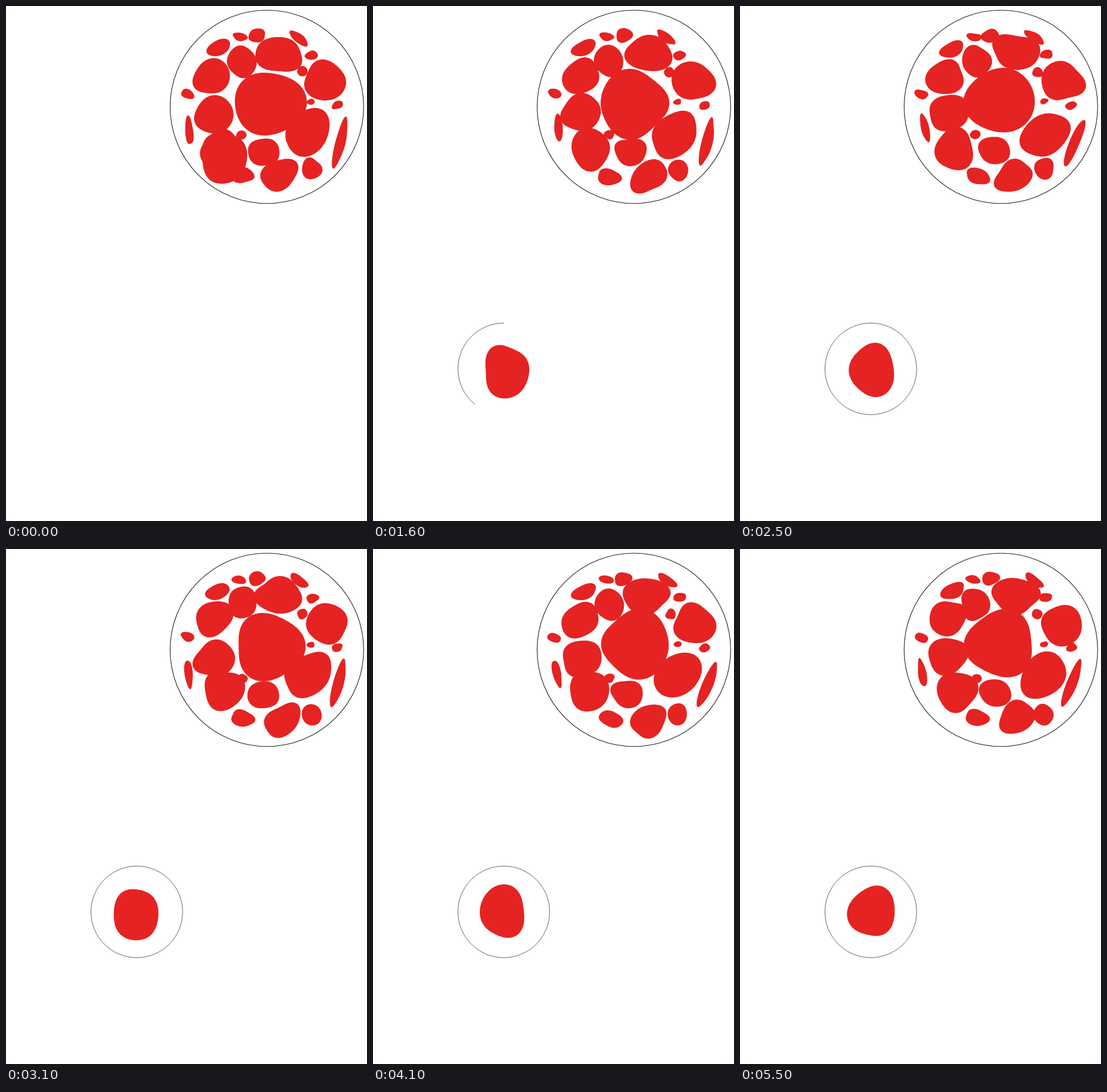
Animation, 626 px wide and 894 px high, one loop 7000 ms. Source, as an HTML page with a canvas:

```html
<!DOCTYPE html>
<html lang="en">
<head>
<meta charset="utf-8">
<title>Cells</title>
<style>
html, body { margin: 0; width: 100%; height: 100%; overflow: hidden; background: #fff; }
canvas { display: block; }
</style>
</head>
<body>
<canvas id="stage" width="626" height="894"></canvas>
<script>
const ctx = document.getElementById('stage').getContext('2d');
const LOOP = 7000, STEP = 100, REST = 5500;
const TRAVEL = 1200, RING_TIME = 1024;
const RED = '#e52322', INK = '#1d1d1b';
const clamp = v => Math.max(0, Math.min(1, v));

let seed = 11;
const rand = () => (seed = (seed * 16807) % 2147483647) / 2147483647;

// A slow wave from -1 to 1 with its own speed and phase.
function wave() {
  const period = 700 + rand() * 1100, phase = rand() * Math.PI * 2;
  return t => Math.sin(t / period * Math.PI * 2 + phase);
}

// A cell is an ellipse that drifts, turns and bulges on its own waves.
function cell([x, y, rx, ry, deg]) {
  const lumps = [0.05, 0.08, 0.035].map((size, i) => ({
    size, order: i + 2, angle: rand() * Math.PI * 2, swing: wave()
  }));
  return {
    x, y, rx, ry, lumps, turn: deg * Math.PI / 180,
    driftX: wave(), driftY: wave(), sway: wave()
  };
}

// Centre, radii and tilt of every cell at rest.
const cluster = [
  [454, 167, 60, 57, 0], [476, 82, 41, 31, 8], [556, 131, 37, 34, 20],
  [526, 221, 45, 35, -42], [361, 188, 36, 31, -20], [358, 123, 34, 29, -35],
  [375, 248, 34, 36, 0], [444, 251, 28, 24, 10], [477, 295, 34, 26, -35],
  [409, 94, 25, 28, -10],
  [509, 55, 19, 8, 36], [435, 51, 15, 12, -15], [405, 54, 13, 7, 10],
  [367, 74, 22, 13, -25], [531, 85, 11, 8, -10], [515, 114, 9, 9, 0],
  [315, 153, 12, 8, 20], [319, 214, 7, 25, -9], [577, 236, 9, 43, 18],
  [574, 172, 10, 7, -20], [528, 166, 7, 5, -10], [409, 224, 9, 8, 0],
  [528, 285, 17, 19, 0], [411, 295, 21, 14, 15]
].map(cell);
const mover = cell([0, 2, 40, 45, 0]);

function drawCell(c, t) {
  const drift = Math.min(3, c.ry * 0.15);
  const turn = c.turn + c.sway(t) * 0.08;
  ctx.save();
  ctx.translate(c.x + drift * c.driftX(t), c.y + drift * c.driftY(t));
  ctx.rotate(turn);
  ctx.beginPath();
  for (let i = 0; i < 90; i++) {
    const a = i / 90 * Math.PI * 2;
    let k = 1;
    for (const l of c.lumps) k += l.size * l.swing(t) * Math.cos(l.order * a + l.angle);
    ctx.lineTo(c.rx * k * Math.cos(a), c.ry * k * Math.sin(a));
  }
  ctx.fill();
  ctx.restore();
}

function ring(x, y, r, part, width) {
  const start = -Math.PI / 2;
  ctx.lineWidth = width;
  ctx.beginPath();
  ctx.arc(x, y, r, start, start - part * Math.PI * 2, true);
  ctx.stroke();
}

function draw(t) {
  ctx.fillStyle = '#fff';
  ctx.fillRect(0, 0, 626, 894);
  ctx.fillStyle = RED;
  ctx.strokeStyle = INK;
  for (const c of cluster) drawCell(c, t);

  // One cell leaves the cluster in a straight line.
  const go = clamp(t / TRAVEL);
  ctx.save();
  ctx.translate(380 - 152 * go, 262 + 368 * go);
  drawCell(mover, t);
  ctx.restore();

  ring(452.4, 175, 167.8, 1, 1.1);
  const drawn = clamp((t - TRAVEL) / RING_TIME);
  if (drawn > 0) ring(226.8, 629.9, 79.5, drawn, 0.7);
}

const begin = performance.now();
function tick() {
  const t = (performance.now() - begin) % LOOP;
  draw(Math.min(REST, Math.floor(t / STEP) * STEP));
  requestAnimationFrame(tick);
}
tick();
</script>
</body>
</html>
```
